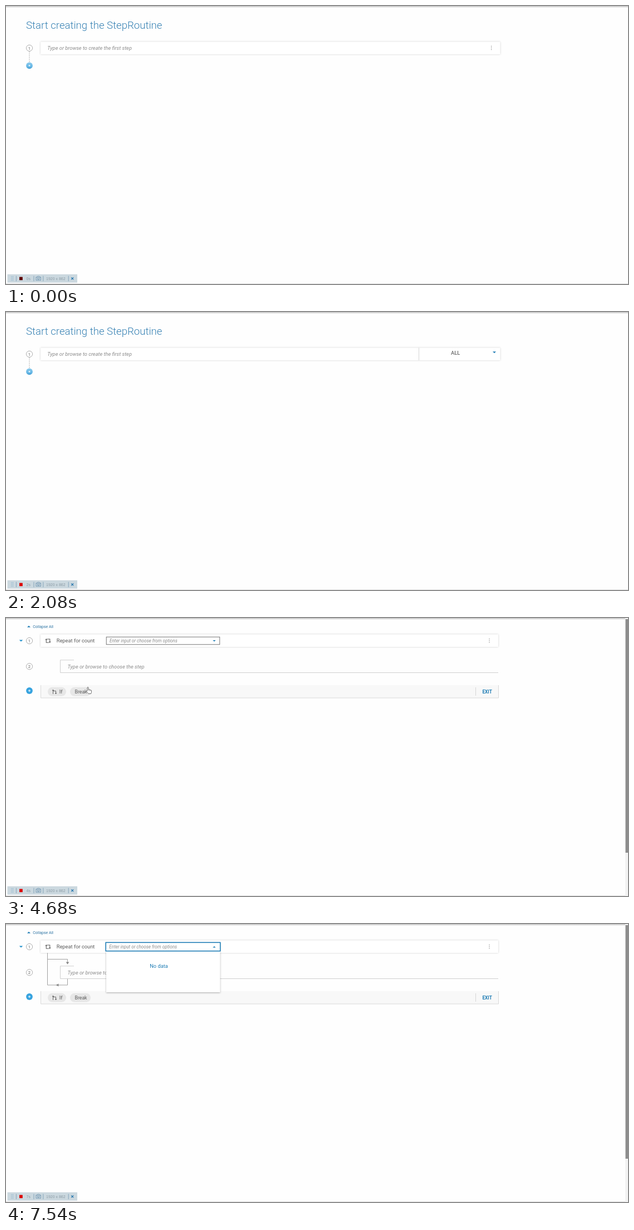
An HTML page for the animation above (8000 ms loop, 1117x501 px).

```html
<!DOCTYPE html>
<html lang="en">
<head>
<meta charset="utf-8">
<title>Flow editor</title>
<style>
  html, body { margin: 0; width: 100%; height: 100%; overflow: hidden; background: #fefefe; }
  svg { display: block; width: 100vw; height: 100vh; font-family: Roboto, sans-serif; }
  .card { fill: #fff; filter: drop-shadow(0 .5px 1.8px rgba(0,0,0,.2)); }
  .menu { fill: #fff; filter: drop-shadow(0 1.2px 1.8px rgba(0,0,0,.32)); }
  .hint { font-style: italic; fill: #8c8c8c; }
  .tool { font-family: "Liberation Sans", Arial, sans-serif; }
</style>
</head>
<body>
<svg id="stage" viewBox="0 0 1117 501"></svg>
<script>
const LOOP = 8000, STEP = 130;
const BLUE = '#1f7db5', GRAY = '#5c5c5c';
const OPEN = 1820, HOVER = 3770, HOVER_NEXT = 4290, ADDED = 4680,
      LINKED = 4940, FOCUS = 5590, DROP = 6110;
// time, typed text, caret position
const typed = [[2470, 'r', 82.7], [2600, 're', 87.9], [2730, 'rep', 93.5], [2860, 'repea', 104.3], [3250, 'repeat', 107.6]];
const mousePath = [[3770, 172, 104], [4160, 150, 111], [4420, 147, 124], [4810, 144, 124], [5070, 146, 122], [5460, 260, 40]];
const rows = ['Repeat', 'Repeat for Count', 'Repeat - Input - Output', 'repeat_count_5', 'repeatforcount', 'repeatio'];

const text = (x, y, size, str, fill = GRAY, extra = '') =>
  `<text x="${x}" y="${y}" font-size="${size}" fill="${fill}" ${extra}>${str}</text>`;
const rect = (x, y, w, h, fill, extra = '') =>
  `<rect x="${x}" y="${y}" width="${w}" height="${h}" fill="${fill}" ${extra}/>`;
const box = (x, y, w, h, cls) => `<rect class="${cls}" x="${x}" y="${y}" width="${w}" height="${h}"/>`;
const line = (d, color, width = 1, extra = '') =>
  `<path d="${d}" fill="none" stroke="${color}" stroke-width="${width}" ${extra}/>`;
const shape = (d, fill) => `<path d="${d}" fill="${fill}"/>`;
const at = (x, y, content) => `<g transform="translate(${x} ${y})">${content}</g>`;
const triangle = (x, y, dir, fill = BLUE, r = 3) =>
  shape(`M${x - r} ${y - dir * r / 2}h${2 * r}l${-r} ${dir * r}z`, fill);

const number = (y, n) =>
  `<circle cx="42" cy="${y}" r="5.6" fill="#fff" stroke="#999" stroke-width=".8"/>` +
  text(42, y + 2.7, 7.6, n, '#666', 'text-anchor="middle"');
const plus = (y, fill, size) =>
  `<circle cx="42" cy="${y}" r="5.9" fill="${fill}"/>` +
  line(`M${42 - size} ${y}h${2 * size}M42 ${y - size}v${2 * size}`, '#fff', 1);
const dots = (x, y) => [-3, 0, 3].map(d => `<circle cx="${x}" cy="${y + d}" r=".75" fill="#888"/>`).join('');

const loopIcon = (x, y, s = 1) => at(x, y, `<g transform="scale(${s})">` +
  line('M-1.5 -2.5H2.7V2M1.5 2.7H-2.7V-2', GRAY, .9) +
  shape('M-4.3 -1.2L-2.7 -3.3L-1.1 -1.2zM1.1 1.2L2.7 3.3L4.3 1.2z', GRAY) + '</g>');
const serviceIcon = (x, y) => at(x, y,
  line('M-5.5 -5H5.5M-5.5 5H5.5', '#666', 1.5) +
  line('M-3 -4V4M-3 -2.4H2V-1M-3 2.4H2V1M5.3 0H0', '#666', 1.1) +
  shape('M-1.5 0L1 -1.9V1.9z', '#666'));
const branchIcon = (x, y) => at(x, y,
  line('M-2.5 4V-3M-2.5 -1.5H2.5V3', GRAY, .9) +
  shape('M-4.2 -2L-2.5 -4.3L-.8 -2zM.8 2L2.5 4.3L4.2 2z', GRAY));

const hand = (x, y) => at(x, y,
  '<path d="M1 1.2Q2-.3 3 1.2V5.2Q4.2 4.4 5 5.5Q6.2 4.9 6.9 6Q8.4 5.7 8.5 7.2V9.5Q8.2 11 7.5 12.5H3.2Q1.7 10.5-.7 8Q-.8 6.3 1 7.3z" fill="#fff" stroke="#444" stroke-width=".75"/>' +
  line('M3.2 5.2V7.5M5 5.7V7.6M6.9 6.2V7.8', '#777', .5));

function mouse(t) {
  const i = mousePath.findIndex(([time]) => time > t);
  if (i < 1) return '';
  const [t0, x0, y0] = mousePath[i - 1], [t1, x1, y1] = mousePath[i];
  const k = (t - t0) / (t1 - t0);
  return hand(x0 + (x1 - x0) * k, y0 + (y1 - y0) * k);
}

function results(t) {
  const selected = t >= HOVER_NEXT ? 1 : 0;
  return rows.map((name, i) => {
    const y = 99.5 + i * 24.5;
    return (i < 3 ? loopIcon(88, y - 1) : serviceIcon(88, y - 1)) +
      text(106, y + 2.8, 7.45, name, '#555', 'font-weight="500"');
  }).join('') +
  rect(62.2, 87.4 + selected * 24.5, 825.2, 23.8, 'none', `stroke="${BLUE}" stroke-width="1.6"`) +
  (t >= HOVER && !selected ? text(222, 102.3, 7.45,
    'Use this step to conditionally repeat a sequence of child steps based on the success or failure of those steps.', '#666') : '');
}

function searchPage(t) {
  const open = t >= OPEN;
  const [lastKey, word, caretX] = typed.filter(([time]) => time <= t).pop() || [1560, '', 74.8];
  const caretOn = t >= lastKey && Math.floor((t - lastKey) / 500) % 2 === 0;
  return text(36, 40.8, 18.6, 'Start creating the StepRoutine', '#3681b3', 'font-weight="300"') +
    line('M42 82V102', '#999', .8, 'stroke-dasharray="2 1.4"') + number(75.8, 1) +
    plus(107.4, 'url(#ball)', 1.5) +
    box(62, 64.5, 825.5, word ? 170.5 : 22.5, word ? 'menu' : 'card') +
    (word ? text(79, 79.2, 9.9, word, '#4d4d4d')
          : text(74.3, 79, 9.31, 'Type or browse to create the first step', '', 'class="hint"')) +
    (caretOn ? rect(caretX - .4, 70, .9, 11, BLUE) : '') +
    (open ? line('M741.5 64.5V87', '#d5d5d5') + text(799, 76.6, 9.31, 'ALL', '#666', 'font-weight="500"') + triangle(877, 72.8, 1)
          : dots(871.7, 75.5)) +
    (word ? results(t) : '');
}

function select(t) {
  const focused = t >= FOCUS, open = t >= DROP;
  return (open ? box(180, 49, 204.5, 74, 'menu') + text(258.2, 79.2, 9.31, 'No data', BLUE) : '') +
    (focused ? rect(179.2, 33.3, 205.6, 15.4, '#fff', `stroke="${BLUE}" stroke-width="1.6"`)
             : rect(180.2, 34.2, 203.6, 13.6, '#fff', 'stroke="#666" stroke-width=".9"')) +
    text(focused ? 185.3 : 186, focused ? 43.7 : 44.2, 8.15, 'Enter input or choose from options', '', 'class="hint"') +
    triangle(374, 41.2, open ? -1 : 1, BLUE, 2.6);
}

function stepPage(t) {
  const links = line('M74.5 52V110H110.5V98.5M74.5 63.5H110.5V69', '#a0a0a0') +
    shape('M107.7 68.4h5.6l-2.8 4.4zM94.4 107.4v5.2L89.8 110z', '#858585');
  return triangle(41, 15.3, -1) + text(48.2, 17.6, 7, 'Collapse All', '#2d74a3') +
    triangle(27, 41, 1, '#1d8fcb', 3.2) + number(41, 1) + number(87.3, 2) + plus(131, '#36a3df', 2.2) +
    box(62, 29.5, 822, 22.5, 'card') + loopIcon(75.5, 41, 1.2) +
    text(90.7, 44.3, 9.31, 'Repeat for count') + dots(868, 40.8) +
    (t >= LINKED ? links : '') +
    line('M122 75.8H97.5V98.5H884', '#cfcfcf') +
    text(110.5, 91.2, 9.31, 'Type or browse to choose the step', '', 'class="hint"') +
    rect(62, 121, 822.5, 23.3, '#f8f8f8') + line('M62.5 121V144H884.5V121', '#d9d9d9') +
    rect(75, 124.8, 33, 16, '#e7e7e7', 'rx="8"') + branchIcon(87, 133) + text(95.7, 136.2, 9.31, 'If') +
    rect(115, 124.8, 37, 16, '#e7e7e7', 'rx="8"') + text(123.5, 136, 8.7, 'Break') +
    line('M843.5 125V140', '#d5d5d5') + text(855.4, 136, 8.3, 'EXIT', BLUE, 'font-weight="700"') +
    select(t) +
    rect(1112, 0, 5, 501, '#f3f3f3') + rect(1112.5, 2, 4.5, 421, '#8d8d8d');
}

function toolbar(t) {
  const red = Math.round(95 + 125 * Math.min(1, t / 910));
  const grip = [0, 1, 2, 3].map(i => [9.4, 12].map(x => rect(x, 487 + i * 2.3, 1, 1, '#6ea3c6')).join('')).join('');
  return rect(2.5, 483.5, 125.5, 15, '#cbd8df') + grip +
    line('M18.4 486.5V496M50 486.5V496M66.8 486.5V496M112.2 486.5V496', '#7da0b7', .9) +
    rect(24, 488.3, 5.8, 5.8, `rgb(${red},0,0)`) +
    text(36.6, 493.6, 7, Math.floor(t / 1000) + 's', '#8b9ba5', 'class="tool"') +
    line('M54 488.6h1.9l1-1.3h2.6l1 1.3h1.9v5.6H54z', '#7c9fb8', 1.1) +
    '<circle cx="58.2" cy="491.2" r="1.7" fill="none" stroke="#7c9fb8" stroke-width="1.1"/>' +
    text(72, 493.6, 7, '1920 x 862', '#8b9ba5', 'class="tool"') +
    line('M117.2 489.1l4 4m0-4l-4 4', '#2576ad', 1.3);
}

const defs = `<defs>
  <linearGradient id="top" x2="0" y2="1"><stop stop-color="#c0c0c0"/><stop offset="1" stop-color="#fefefe"/></linearGradient>
  <linearGradient id="ball" x2="0" y2="1"><stop stop-color="#8dcbed"/><stop offset=".7" stop-color="#64b6e5"/><stop offset="1" stop-color="#3a98cf"/></linearGradient>
</defs>`;
const stage = document.getElementById('stage');
const start = performance.now();
let shown = -1;

function frame() {
  const elapsed = (performance.now() - start) % LOOP;
  const t = Math.floor(elapsed / STEP) * STEP;
  if (t !== shown) {
    shown = t;
    stage.innerHTML = defs + rect(0, 0, 1117, 501, '#fefefe') + rect(0, 0, 1117, 3.5, 'url(#top)') +
      rect(0, 500, 1117, 1, '#dedede') + (t < ADDED ? searchPage(t) : stepPage(t)) + toolbar(t) + mouse(t);
  }
  requestAnimationFrame(frame);
}
frame();
</script>
</body>
</html>
```
